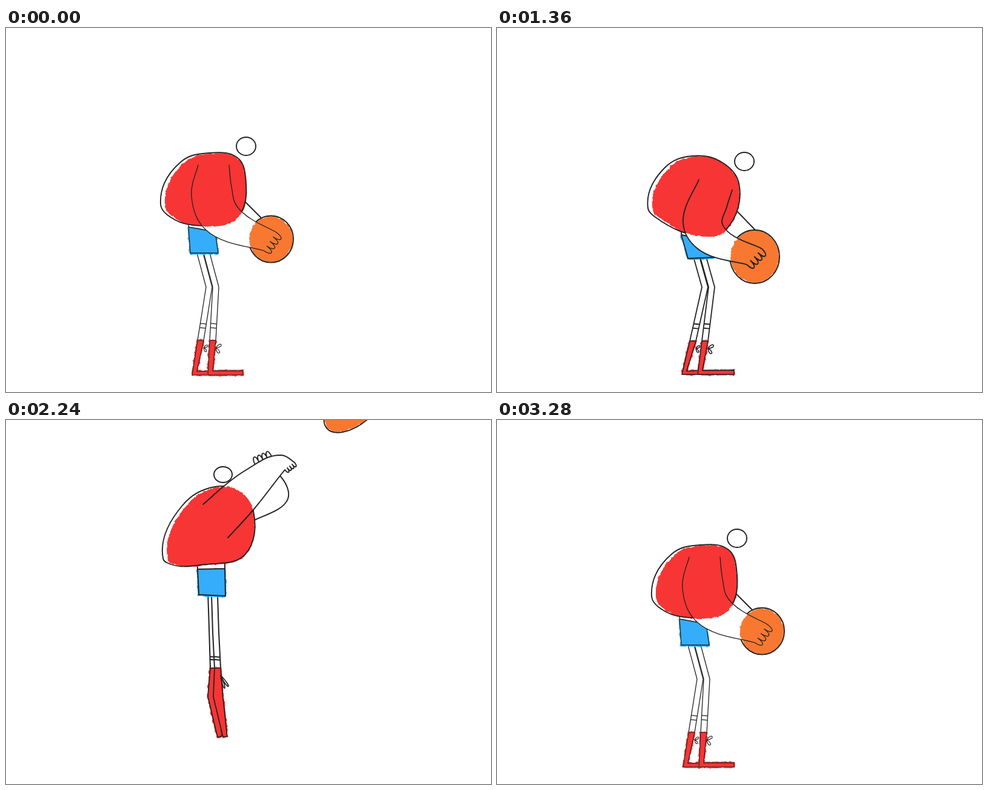
An HTML page for the animation above (3360 ms loop, 800x600 px).

```html
<!DOCTYPE html>
<html lang="en">
<head>
<meta charset="utf-8">
<title>Ball player</title>
<style>
  html, body { margin: 0; width: 100%; height: 100%; overflow: hidden; background: #fff; }
  svg { display: block; width: 800px; height: 600px; }
  path { fill: none; stroke: #222; stroke-width: 1.9; stroke-linecap: round; stroke-linejoin: round; }
  .ink { stroke: none; filter: url(#rough); }
  .red { fill: #f73535; }
  .blue { fill: #35adfa; }
  .orange { fill: #f87832; }
  .white { fill: #fff; }
  .edge { stroke-width: 3; }
  .red.edge { stroke: #f73535; }
  .blue.edge { stroke: #35adfa; }
</style>
</head>
<body>
<svg viewBox="0 0 800 600">
  <defs>
    <filter id="rough" filterUnits="userSpaceOnUse" x="0" y="0" width="800" height="600">
      <feTurbulence id="noise" type="fractalNoise" baseFrequency="0.16" numOctaves="2"/>
      <feDisplacementMap in="SourceGraphic" scale="4" xChannelSelector="R" yChannelSelector="G"/>
    </filter>
    <mask id="outsideArm" maskUnits="userSpaceOnUse" x="-200" y="-200" width="1400" height="1000">
      <rect x="-200" y="-200" width="1400" height="1000" fill="#fff"/>
      <path id="armShape" style="fill:#000;stroke:none"/>
    </mask>
  </defs>
  <g id="stage"></g>
</svg>
<script>
const STEP = 80, LOOP = 3360;

// Joints of each pose. arm: shoulder to wrist, then wrist back to shoulder.
// leg: knee, ankle, heel, toe. head: centre, radii, turn. look: stride, line weight.
const poses = {
  hold: {
    body: '255,290 288,221 335,206 382,214 395,245 382,312 325,326 266,308',
    arm: '317,226 306,278 330,333 425,367 446,337 381,294 372,262 368,226',
    backArm: '391,283 421,313',
    shorts: '301,328 345,336 350,371 304,371',
    leg: '346,427 341,515 333,572 391,572',
    head: '396,195 16,15 0', look: '20,1.3'
  },
  push: {
    body: '255,296 290,224 332,207 376,221 396,250 378,322 345,335 270,311',
    arm: '306,258 313,292 330,335 370,408 409,405 391,318 378,275 365,240',
    backArm: '391,287 412,314 427,333 434,352 400,346',
    shorts: '305,333 345,340 351,372 309,374',
    leg: '357,427 345,519 335,572 393,572',
    head: '397,199 15,13 0', look: '20,1.5'
  },
  dip: {
    body: '249,297 277,230 322,211 372,222 399,256 378,332 350,343 260,311',
    arm: '333,250 307,322 330,363 412,390 437,364 372,324 379,295 388,267',
    backArm: '392,298 426,333',
    shorts: '304,341 348,349 358,378 315,380',
    leg: '354,427 343,516 331,571 391,571',
    head: '408,220 16,15 0', look: '20,1.8'
  },
  swing: {
    body: '271,303 312,244 352,224 396,243 426,294 400,352 376,379 300,342',
    arm: '326,275 345,343 390,372 501,290 488,256 440,279 414,295 397,252',
    backArm: '425,288',
    shorts: '315,362 372,384 386,416 334,424',
    leg: '382,453 354,514 327,571 397,571',
    head: '420,221 12,23.5 -15', look: '8,2'
  },
  stretch: {
    body: '259,228 290,142 345,110 385,117 408,150 394,222 330,238 265,235',
    arm: '366,194 408,148 452,92 460,82 476,70 455,58 395,83 325,139',
    backArm: '408,166 465,130 452,92 410,72 438,60',
    shorts: '316,246 361,245 362,290 318,288',
    leg: '346,350 349,409 342,456 358,523',
    head: '358,90 15,13 0', look: '7,2'
  },
  apex: {
    body: '269,162 306,87 355,61 395,72 416,110 405,177 350,181 275,168',
    arm: '380,145 415,104 452,46 461,37 478,23 455,13 395,42 333,89',
    backArm: '417,121 465,85 450,52 416,25 430,19',
    shorts: '328,188 380,190 371,241 319,232',
    leg: '346,300 348,371 344,425 351,459',
    head: '383,43 16,16 0', look: '7,2'
  }
};

// centre, radii, turn
const balls = {
  hold: '437,348 37,38.5 0', drop: '401,515 22,51 0', floor: '401,541 46,31 0',
  dip: '425,377 41,44 0', swing: '489,307 36,74 12', over: '470,140 38,44 0',
  release: '515,60 46,34 -40', away: '575,-25 60,32 -40', gone: '700,-150 60,32 -40',
  outside: '900,150 40,36 0', pass: '622,290 41,36 20'
};

// time, name
const bodyKeys = [], ballKeys = [];
for (const start of [0, 560]) {
  bodyKeys.push([start, 'hold'], [start + 160, 'push'], [start + 240, 'push'], [start + 480, 'hold']);
  ballKeys.push([start, 'hold'], [start + 160, 'drop'], [start + 240, 'floor'],
    [start + 320, 'drop'], [start + 480, 'hold']);
}
bodyKeys.push([1280, 'hold'], [1360, 'dip'], [1680, 'dip'], [1760, 'swing'], [1840, 'swing'],
  [2160, 'stretch'], [2240, 'stretch'], [2480, 'apex'], [2560, 'apex'], [2800, 'land'],
  [2960, 'dip'], [3120, 'hold'], [LOOP, 'hold']);
ballKeys.push([1280, 'hold'], [1360, 'dip'], [1680, 'dip'], [1760, 'swing'], [2080, 'over'],
  [2160, 'release'], [2240, 'away'], [2400, 'gone'], [2560, 'outside'], [2800, 'pass'],
  [2960, 'dip'], [3120, 'hold'], [LOOP, 'hold']);

const jump = t => Math.max(0, 120 * (1 - ((t - 2480) / 320) ** 2));
const lerp = (a, b, k) => a.map((v, i) => v + (b[i] - v) * k);
const numbers = s => s.split(/[ ,]/).map(Number);
const mapParts = (pose, fn) =>
  Object.fromEntries(Object.entries(pose).map(([name, v]) => [name, fn(v, name)]));
const mix = (a, b, k) => mapParts(a, (v, name) => lerp(v, b[name], k));
const shift = (pose, dy) => mapParts(pose, (v, name) => name === 'look' ? v
  : v.map((n, i) => (name === 'head' ? i === 1 : i % 2) ? n + dy : n));

for (const name in balls) balls[name] = numbers(balls[name]);
for (const name in poses) {
  const pose = poses[name] = mapParts(poses[name], numbers);
  while (pose.backArm.length < 10) pose.backArm.push(...pose.backArm.slice(-2));
}
// Airborne poses are kept at ground level; the jump lifts them
poses.stretch = shift(poses.stretch, jump(2240));
poses.apex = shift(poses.apex, jump(2560));
const lowered = shift(poses.hold, -46);
poses.land = { ...poses.stretch, arm: lowered.arm, backArm: lowered.backArm };

function sample(keys, t, table, blend) {
  const i = keys.findIndex(key => key[0] > t);
  const [t0, from] = keys[i - 1], [t1, to] = keys[i];
  return blend(table[from], table[to], (t - t0) / (t1 - t0));
}

const points = v => Array.from({ length: v.length / 2 }, (_, i) => [v[2 * i], v[2 * i + 1]]);
const line = (pts, closed) => 'M' + pts.map(p => p.join()).join('L') + (closed ? 'Z' : '');
const add = (p, q, k = 1) => [p[0] + q[0] * k, p[1] + q[1] * k];
const sub = (p, q) => add(p, q, -1);
const unit = p => { const n = Math.hypot(...p) || 1; return [p[0] / n, p[1] / n]; };
const polar = (r, degrees) => [r * Math.cos(degrees * Math.PI / 180), r * Math.sin(degrees * Math.PI / 180)];

// Smooth curve through all points
function curve(pts, closed) {
  const n = pts.length;
  const at = i => pts[closed ? (i + n) % n : Math.max(0, Math.min(n - 1, i))];
  const slope = i => lerp(unit(sub(at(i), at(i - 1))), unit(sub(at(i + 1), at(i))), .5);
  let d = 'M' + pts[0];
  for (let i = 0; i < (closed ? n : n - 1); i++) {
    const reach = Math.hypot(...sub(at(i + 1), at(i))) * .4;
    d += `C${add(at(i), slope(i), reach)} ${add(at(i + 1), slope(i + 1), -reach)} ${at(i + 1)}`;
  }
  return d + (closed ? 'Z' : '');
}

function fingers(a, b, side) {
  const [dx, dy] = sub(b, a), out = [-dy * side * .45, dx * side * .45];
  let d = '';
  for (let i = 0; i < 4; i++) {
    const p = lerp(a, b, i / 4), q = lerp(a, b, (i + 1) / 4);
    d += `C${add(p, out)} ${add(q, out)} ${q}`;
  }
  return d;
}

function frontArm(v) {
  const p = points(v);
  return curve(p.slice(0, 4)) + fingers(p[3], p[4], 1) + curve(p.slice(4)).replace('M', 'L');
}

function rearArm(v) {
  const p = points(v);
  return curve(p.slice(0, 4)) + fingers(p[3], p[4], -1);
}

function oval([cx, cy, rx, ry, turn], inset = 0) {
  const r = rx - inset, [dx, dy] = polar(r, turn);
  const arc = `A${r} ${ry - inset} ${turn} 1 1 `;
  return `M${cx - dx} ${cy - dy}${arc}${cx + dx} ${cy + dy}${arc}${cx - dx} ${cy - dy}Z`;
}

function limb(hip, knee, ankle) {
  const joints = [hip, knee, ankle];
  const left = joints.map(p => add(p, [-5, 0])), right = joints.map(p => add(p, [5, 0]));
  const sock = k => line([lerp(left[1], left[2], k), lerp(right[1], right[2], k)]);
  return line([...left, ...right.reverse()], true) + [.68, .76].map(k =>
    line([lerp(knee, ankle, k), lerp(knee, ankle, k)].map((p, i) => add(p, [i ? 5 : -5, i]))));
}

function shoe(ankle, heel, toe) {
  const [ux, uy] = unit(sub(toe, heel)), [sx, sy] = unit(sub(ankle, heel));
  const up = [uy, -ux], across = [-sy, sx];
  const instep = add(add(heel, up, 8), across, 8);
  return line([add(ankle, [-5, 0]), heel, toe, add(toe, up, 7), instep, add(ankle, [5, 0])], true);
}

function bow(ankle, droop, size) {
  const o = add(ankle, [5, 12]);
  return [-1, 1].map(side => {
    const angle = 14 + 50 * droop + side * (43 - 34 * droop), length = size * (13 + 12 * droop);
    const petal = spread => add(o, polar(length * 1.2, angle + spread));
    const width = 28 - 18 * droop;
    return `M${o}C${petal(-width)} ${petal(width)} ${o}`;
  }).join('');
}

const stage = document.getElementById('stage');
const armShape = document.getElementById('armShape');
const noise = document.getElementById('noise');

function layer(className, masked) {
  const el = document.createElementNS('http://www.w3.org/2000/svg', 'path');
  if (className) el.setAttribute('class', className);
  if (masked) el.setAttribute('mask', 'url(#outsideArm)');
  return stage.appendChild(el);
}

const art = {
  backArm: layer('', true), head: layer('', true),
  backLeg: layer('white'), backShoeInk: layer('ink red edge'), backShoe: layer(), backBow: layer(),
  frontLeg: layer('white'), frontShoeInk: layer('ink red edge'), frontShoe: layer(), frontBow: layer(),
  shortsInk: layer('ink blue edge', true), shorts: layer('', true),
  fill: layer('ink red'), body: layer('', true),
  ballInk: layer('ink orange'), ball: layer('', true), arm: layer()
};

function draw(t) {
  const pose = shift(sample(bodyKeys, t, poses, mix), -jump(t));
  const ball = sample(ballKeys, t, balls, lerp);
  const set = (name, d) => art[name].setAttribute('d', d);
  const [stride, weight] = pose.look;

  set('arm', frontArm(pose.arm));
  armShape.setAttribute('d', frontArm(pose.arm) + 'Z');
  set('backArm', rearArm(pose.backArm));
  set('head', oval(pose.head));
  set('ball', oval(ball));
  set('ballInk', oval(ball, 1));

  // The colour is a slightly narrower print, aligned on the right
  const body = points(pose.body), right = Math.max(...body.map(p => p[0]));
  set('body', curve(body, true));
  set('fill', curve(body.map(([x, y]) => [right - (right - x) * .95, y + 1]), true));

  const shorts = points(pose.shorts);
  const waist = shorts.slice(0, 2).map(p => line([p, add(p, [0, -8])])).join('');
  set('shorts', line(shorts, true) + waist);
  set('shortsInk', line(shorts.map(p => add(p, [0, 1])), true));

  const [knee, ankle, heel, toe] = points(pose.leg);
  const hip = add(lerp(shorts[2], shorts[3], .5), [4, 0]);
  const droop = (20 - stride) / 13, gap = 3 + stride * .4;
  const drawLeg = (side, hipGap, footGap, heelGap, bowSize) => {
    const move = (p, x) => add(p, [-x, 0]), foot = move(ankle, footGap);
    const outline = shoe(foot, move(heel, heelGap), move(toe, heelGap));
    set(side + 'Leg', limb(move(hip, hipGap), move(knee, hipGap), foot));
    set(side + 'Shoe', outline);
    set(side + 'ShoeInk', outline);
    set(side + 'Bow', bow(foot, droop, bowSize));
  };
  drawLeg('back', gap, stride, stride * 1.3, .75);
  drawLeg('front', 0, 0, 0, 1);

  for (const name of ['arm', 'backLeg', 'frontLeg', 'shorts']) art[name].style.strokeWidth = weight;
  for (const name of ['backShoe', 'frontShoe', 'backBow', 'frontBow'])
    art[name].style.strokeWidth = weight * .85;
  noise.setAttribute('seed', 1 + t / STEP % 5);
}

let start, shown = -1;
function tick(now) {
  start ??= now;
  const t = Math.floor((now - start) % LOOP / STEP) * STEP;
  if (t !== shown) draw(shown = t);
  requestAnimationFrame(tick);
}
draw(0);
requestAnimationFrame(tick);
</script>
</body>
</html>
```
